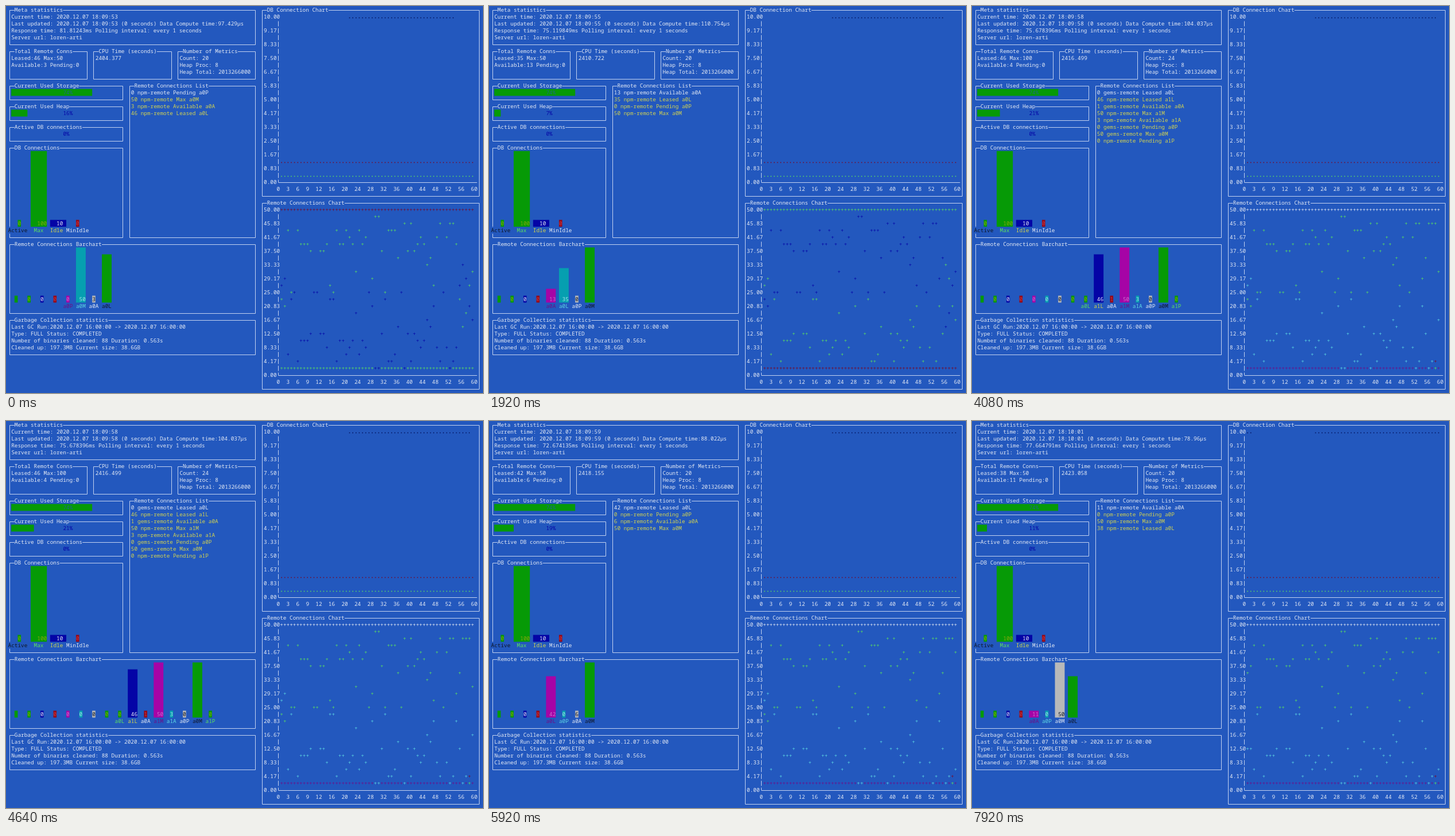
Write an HTML page with a canvas that moves like this. It is 831 px wide and 674 px high and loops after 8 s.

```html
<!DOCTYPE html>
<html>
<head>
<meta charset="utf-8">
<style>
html, body { margin: 0; width: 100%; height: 100%; overflow: hidden; background: #2358be; }
canvas { display: block; }
</style>
</head>
<body>
<canvas id="stage" width="831" height="674"></canvas>
<script>
const ctx = document.getElementById('stage').getContext('2d');
const LOOP = 8000, CW = 5.64, RH = 12;
const C = {
  bg: '#2358be', line: '#c3d2f0', white: '#e4eaf5', yellow: '#d3d34f', black: '#101828',
  green: '#069a06', lime: '#5be05f', olive: '#86a80c', blue: '#0404a6', red: '#960818',
  magenta: '#a604a6', purple: '#700c86', cyan: '#069fb0', aqua: '#5cd6e2', gray: '#b9b9b9',
  maroon: '#780828', navy: '#02125c'
};
const BARS = [C.green, C.green, C.blue, C.red, C.magenta, C.cyan, C.gray];
const DIGITS = [C.green, C.olive, C.white, '#c03a48', '#cf6ccf', '#a5e4ea', C.black];
const LABELS = [C.black, C.lime, C.yellow, C.white, C.purple, C.aqua, C.white];

// Terminal grid: column edge, row centre
const X = col => 3.5 + CW * col;
const Y = row => 7 + RH * row;

function text(col, row, str, color = C.white) {
  ctx.fillStyle = color;
  ctx.fillText(str, X(col), Y(row) + 3.4);
}
function cells(col, row, w, h, color) {
  ctx.fillStyle = color;
  ctx.fillRect(X(col), RH * row + 0.5, w * CW, h * RH);
}
function rule(x1, y1, x2, y2) {
  ctx.strokeStyle = C.line;
  ctx.lineWidth = 1;
  ctx.beginPath();
  ctx.moveTo(x1, y1);
  ctx.lineTo(x2, y2);
  ctx.stroke();
}
function box(c1, r1, c2, r2, title, lines = []) {
  const snap = v => Math.floor(v) + 0.5;
  const l = snap(X(c1 + 0.5)), r = snap(X(c2 + 0.5)), t = Y(r1) + 0.5, b = Y(r2) + 0.5;
  rule(l, t, X(c1 + 2), t);
  rule(X(c1 + 2 + title.length), t, r, t);
  rule(l, t, l, b);
  rule(r, t, r, b);
  rule(l, b, r, b);
  text(c1 + 2, r1, title);
  lines.forEach((s, i) => text(c1 + 1, r1 + 1 + i, s));
}
function gauge(row, title, pct, color) {
  box(0, row, 35, row + 2, title);
  cells(1, row + 1, Math.floor(34 * pct / 100), 1, C.green);
  text(17, row + 1, pct + '%', color);
}
function axes(top, max) {
  const x = Math.floor(X(83.5)) + 0.5;
  for (let i = 0; i <= 24; i++) {
    const label = i % 2 ? '' : (max * (24 - i) / 24).toFixed(2);
    const y = Y(top + i);
    text(79, top + i, label);
    if (label.length < 5) rule(x, y - 4.5, x, i == 24 ? y : y + 4.5);
  }
  rule(x, Y(top + 24) + 0.5, X(144) + 5, Y(top + 24) + 0.5);
  for (let v = 0; v <= 60; v += v < 12 ? 3 : 4) text(83 + v, top + 25, '' + v);
}

// Leased connections for each second of the minute, then the samples that follow :53
const leased = [
  22, 20, 44, 26, 25, 45, 40, 40, 40, 38, 25, 25, 38, 38, 41, 27, 26, 45, 40, 40,
  44, 42, 40, 31, 44, 40, 42, 25, 29, 48, 48, 38, 26, 45, 45, 44, 35, 25, 47, 38,
  46, 38, 40, 42, 40, 33, 35, 28, 42, 46, 25, 42, 47, 46, 41, 22, 15, 19, 28, 32];
const fresh = [29, 36, 47, 46, 46, 43, 36, 38];

// Draw order and colours of the (M)ax, (P)ending, (L)eased and (A)vailable series
const first = { M: C.maroon, P: C.lime, L: C.lime, A: C.blue };
const second = { M: C.lime, A: C.lime, L: C.blue, P: C.maroon };
const third = { M: C.white, P: C.purple, A: C.aqua, L: C.lime };

const npm = s => s.split(' ').map(p => ['npm', ...p.split(':')]);
const states = [
  { at: 0, n: 0, compute: '97.429', response: '81.81243', cpu: '2404.377', heap: 16,
    series: first, list: npm('a0P:0 a0M:50 a0A:3 a0L:46') },
  { at: 1280, n: 2, compute: '110.754', response: '75.119849', cpu: '2410.722', heap: 7,
    series: second, list: npm('a0A:13 a0L:35 a0P:0 a0M:50') },
  { at: 2880, n: 3, compute: '115.932', response: '73.767982', cpu: '2411.825', heap: 5,
    series: second, list: npm('a0L:46 a0A:2 a0P:0 a0M:50') },
  { at: 3760, n: 5, compute: '104.037', response: '75.678396', cpu: '2416.499', heap: 21,
    series: third, list: npm('a0L:0 a1L:46 a0A:1 a1M:50 a1A:3 a0P:0 a0M:50 a1P:0')
      .map(([, id, v]) => [id[1] == '0' ? 'gems' : 'npm', id, v]) },
  { at: 5040, n: 6, compute: '88.022', response: '72.674135', cpu: '2418.155', heap: 19,
    series: third, list: npm('a0L:42 a0P:0 a0A:6 a0M:50') },
  { at: 6320, n: 8, compute: '78.96', response: '77.664791', cpu: '2423.058', heap: 11,
    series: third, list: npm('a0A:11 a0P:0 a0M:50 a0L:38') }
];
const KINDS = { L: 'Leased', M: 'Max', A: 'Available', P: 'Pending' };

function dbBars() {
  box(0, 20, 35, 33, 'DB Connections');
  cells(3, 31, 1, 1, C.green);
  cells(7, 21, 5, 11, C.green);
  cells(13, 31, 5, 1, C.blue);
  cells(21, 31, 1, 1, C.red);
  text(3, 31, '0', C.olive);
  text(9, 31, '100', C.olive);
  text(15, 31, '10');
  text(21, 31, '0', DIGITS[3]);
  cells(0, 32, 1, 1, C.bg);
  text(0, 32, 'Active', C.black);
  text(8, 32, 'Max', C.lime);
  text(13, 32, 'Idle', C.yellow);
  text(18, 32, 'MinIdle');
}
function remoteBars(list) {
  box(0, 34, 76, 44, 'Remote Connections Barchart');
  const bars = [...list.map(() => ['', '', '0']), ...list];
  bars.forEach(([, id, v], k) => {
    const col = 1 + 4 * k, h = Math.floor(v * 8 / 50), c = k % 7;
    if (h) cells(col, 43 - h, 3, h, BARS[c]);
    else cells(col + 1, 42, 1, 1, BARS[c]);
    text(col + 1, 42, v, k == 7 && !h ? C.olive : DIGITS[c]);
    text(col, 43, id, LABELS[c]);
  });
}
function dbChart(n) {
  box(78, 0, 145, 27, 'DB Connection Chart');
  axes(1, 10);
  const dot = (i, y, color) => {
    ctx.fillStyle = color;
    ctx.fillRect(X(84.5 + i) - 0.8, y - 0.7, 1.6, 1.5);
  };
  for (let i = 0; i < 60; i++) {
    dot(i, 272.5, C.maroon);
    dot(i, 296.5, C.lime);
    if (i >= 21 && i <= 53 + n || i <= n - 7) dot(i, 20.5, C.navy);
  }
}
function remoteChart({ n, series }) {
  box(78, 28, 145, 55, 'Remote Connections Chart');
  axes(29, 50);
  const data = leased.slice();
  for (let i = 0; i < n; i++) data[(54 + i) % 60] = fresh[i];
  const value = { M: () => 50, P: () => 0, L: v => v, A: v => 49 - v };
  // The last series wins where two share a cell
  const grid = new Map();
  for (const key in series) {
    data.forEach((v, i) => {
      const row = 52 - Math.floor(value[key](v) * 0.46);
      grid.set(row * 60 + i, series[key]);
    });
  }
  if (n >= 5) {
    grid.set(51 * 60 + 58, C.maroon);
    grid.set(52 * 60 + 58, C.lime);
  }
  grid.forEach((color, k) => text(84 + k % 60, Math.floor(k / 60), '+', color));
}

function draw(t) {
  const s = states.filter(st => st.at <= t).pop();
  const sec = 53 + s.n, two = v => String(v).padStart(2, '0');
  const clock = '2020.12.07 18:' + two(9 + Math.floor(sec / 60)) + ':' + two(sec % 60);
  const sum = kind => s.list.reduce((a, [, id, v]) => a + (id[2] == kind ? +v : 0), 0);

  ctx.fillStyle = C.bg;
  ctx.fillRect(0, 0, 831, 674);
  ctx.font = '9.4px "Noto Sans Mono", monospace';

  box(0, 0, 76, 5, 'Meta statistics', [
    'Current time: ' + clock,
    `Last updated: ${clock} (0 seconds) Data Compute time:${s.compute}µs`,
    `Response time: ${s.response}ms Polling interval: every 1 seconds`,
    'Server url: loren-arti']);
  box(0, 6, 24, 10, 'Total Remote Conns', [
    `Leased:${sum('L')} Max:${sum('M')}`,
    `Available:${sum('A')} Pending:${sum('P')}`]);
  box(26, 6, 50, 10, 'CPU Time (seconds)', [s.cpu]);
  box(52, 6, 76, 10, 'Number of Metrics', [
    'Count: ' + (16 + s.list.length), 'Heap Proc: 8', 'Heap Total: 2013266000']);

  gauge(11, 'Current Used Storage', 74, '#1c6a86');
  gauge(14, 'Current Used Heap', s.heap, C.blue);
  gauge(17, 'Active DB connections', 0, C.blue);
  dbBars();

  box(37, 11, 76, 33, 'Remote Connections List');
  s.list.forEach(([repo, id, v], i) =>
    text(38, 12 + i, `${v} ${repo}-remote ${KINDS[id[2]]} ${id}`, i ? C.yellow : C.white));

  remoteBars(s.list);
  box(0, 45, 76, 50, 'Garbage Collection statistics', [
    'Last GC Run:2020.12.07 16:00:00 -> 2020.12.07 16:00:00',
    'Type: FULL Status: COMPLETED',
    'Number of binaries cleaned: 88 Duration: 0.563s',
    'Cleaned up: 197.3MB Current size: 38.6GB']);
  dbChart(s.n);
  remoteChart(s);
}

const start = performance.now();
function tick() {
  draw((performance.now() - start) % LOOP);
  requestAnimationFrame(tick);
}
tick();
</script>
</body>
</html>
```
